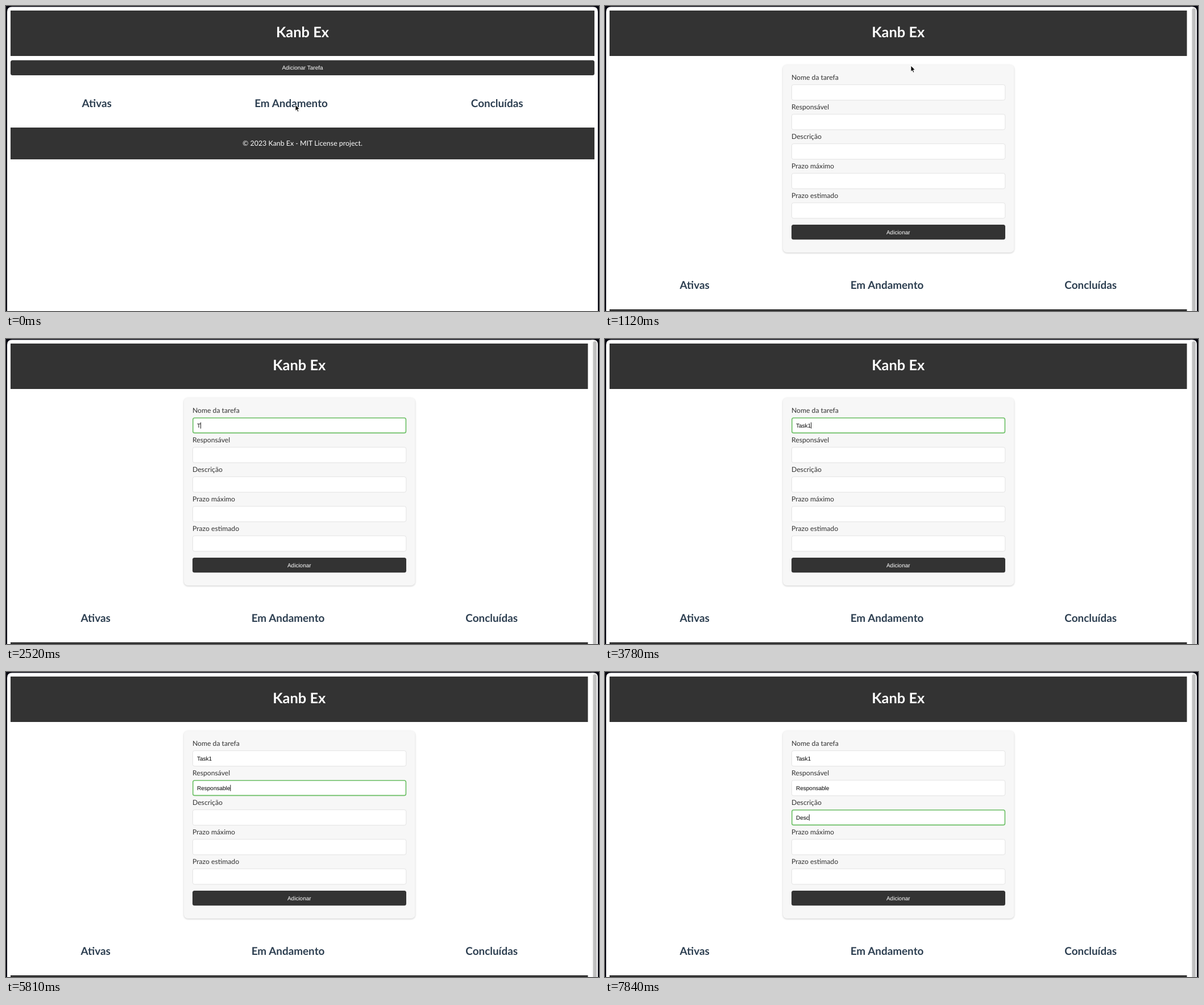
An HTML page for the animation above (8 s loop, 1043 by 537 pixels).

```html
<!DOCTYPE html>
<html lang="pt">
<head>
<meta charset="utf-8">
<title>Kanb Ex</title>
<style>
html, body { margin: 0; height: 100%; overflow: hidden; background: #080812; }
svg { display: block; width: 100%; height: 100%; text-rendering: geometricPrecision; }
text { font-family: Lato, sans-serif; white-space: pre; }
.mid { text-anchor: middle; }
.h1 { font-size: 25.4px; font-weight: 700; fill: #fff; }
.h2 { font-size: 18.9px; font-weight: 700; fill: #2c3e50; }
.label { font-size: 12.2px; fill: #333; }
.foot { font-size: 12.4px; fill: #fff; }
.ui { font: 10px "Liberation Sans", Arial, sans-serif; }
.dark { fill: #333; }
.light { fill: #fff; }
.form { fill: #f7f7f7; filter: drop-shadow(0 1.5px 1.5px rgba(0, 0, 0, .2)); }
.box { fill: #fff; stroke: #ddd; stroke-width: .8; }
.ring { fill: none; stroke: #6cc065; stroke-width: 1.6; }
</style>
</head>
<body>
<svg id="stage" viewBox="0 0 1043 537"></svg>
<script>
const LOOP = 8000, OPEN = 1120, BLINK = 560, FADE = 140;

// Focus time of each field and the time of each keystroke
const fields = [
  { label: 'Nome da tarefa', focus: 1960, word: 'Task1', keys: [2450, 2800, 2940, 3080, 3500] },
  { label: 'Responsável', focus: 3920, word: 'Responsable',
    keys: [4410, 4480, 4620, 4900, 5040, 5110, 5250, 5320, 5530, 5670, 5810] },
  { label: 'Descrição', focus: 6580, word: 'Desc', keys: [7490, 7560, 7700, 7840] },
  { label: 'Prazo máximo' },
  { label: 'Prazo estimado' }
];

// Pointer stops: time, x, y
const path = [[0, 509, 174], [210, 543, 164], [350, 543, 164], [630, 538, 105],
              [1330, 538, 105], [1610, 481, 153], [LOOP, 481, 153]];
const POINTER_HIDE = 2520;

const rect = (cls, x, y, w, h, r = 0) =>
  `<rect class="${cls}" x="${x}" y="${y}" width="${w}" height="${h}" rx="${r}"/>`;
const text = (cls, x, y, s) => `<text class="${cls}" x="${x}" y="${y}">${s}</text>`;

function page(width, top, centers) {
  const mid = 8 + width / 2;
  return rect('dark', 8, 8, width, 80) + text('h1 mid', mid, 55, 'Kanb Ex') +
    ['Ativas', 'Em Andamento', 'Concluídas']
      .map((s, i) => text('h2 mid', centers[i], top + 178, s)).join('') +
    rect('dark', 8, top + 214, width, 56) +
    text('foot mid', mid, top + 246, '© 2023 Kanb Ex - MIT License project.');
}

function fieldMarkup(f, i) {
  const y = 52 * i;
  return text('label', 328, 130 + y, f.label) +
    rect('box', 328.4, 138.6 + y, 375.4, 27.2, 3.2) +
    `<g class="entry">${rect('ring', 328.8, 139 + y, 374.6, 26.4, 3)}` +
    `${text('ui', 336, 155.7 + y, '')}${rect('caret', 336, 146.7 + y, .9, 11)}</g>`;
}

const stage = document.getElementById('stage');
stage.innerHTML =
  '<path fill="#fff" d="M2 540V10Q2 1.5 10.500 1.500H1032.500Q1041 1.500 1041 10V540Z"/>' +
  `<g id="closed">${page(1027, 0, [159.7, 501.6, 863.7])}` +
  rect('dark', 8, 95.6, 1027, 26.4, 3.5) +
  text('ui light mid', 521.5, 112.2, 'Adicionar Tarefa') + '</g>' +
  `<g id="open">${page(1015.5, 320, [157.7, 496.1, 854.2])}` +
  '<path fill="#fafafa" d="M1029.500 1.500H1033Q1041 1.500 1041 10V540H1029.500Z"/>' +
  '<rect fill="#c1c1c1" x="1032.500" y="4" width="6.500" height="560" rx="3.250"/>' +
  rect('form', 313, 103.5, 406.5, 330.5, 7) +
  fields.map(fieldMarkup).join('') +
  rect('dark', 328, 385, 376, 26.3, 3.5) +
  text('ui light mid', 515.8, 401.7, 'Adicionar') + '</g>' +
  '<path id="pointer" stroke="#fff" stroke-width=".9" ' +
  'd="M0 0V10.600L2.400 8.400L4.100 12.200L5.900 11.400L4.200 7.700H7.500Z"/>';

const closed = document.getElementById('closed');
const open = document.getElementById('open');
const pointer = document.getElementById('pointer');
const entries = [...document.querySelectorAll('.entry')];
const show = (el, on) => el.setAttribute('visibility', on ? 'inherit' : 'hidden');
const clamp = v => Math.max(0, Math.min(1, v));

function movePointer(t) {
  const i = path.findIndex(p => p[0] > t);
  const [t0, x0, y0] = path[i - 1], [t1, x1, y1] = path[i];
  const u = (t - t0) / (t1 - t0), e = u * u * (3 - 2 * u);
  pointer.setAttribute('transform', `translate(${x0 + (x1 - x0) * e} ${y0 + (y1 - y0) * e})`);
  show(pointer, t < POINTER_HIDE);
}

function updateField(f, i, t) {
  const [ring, label, caret] = entries[i].children;
  const { focus = Infinity, word = '', keys = [] } = f;
  const blur = fields[i + 1]?.focus ?? Infinity;
  const typed = keys.filter(k => k <= t);
  label.textContent = word.slice(0, typed.length);
  ring.setAttribute('opacity', clamp((t - focus) / FADE) * (1 - clamp((t - blur) / FADE)));
  const since = t - (typed.at(-1) ?? focus);
  const active = t >= focus && t < blur;
  show(caret, active && since % (2 * BLINK) < BLINK);
  if (active) caret.setAttribute('x', 336 + label.getComputedTextLength());
}

function frame(now) {
  const t = now % LOOP;
  show(closed, t < OPEN);
  show(open, t >= OPEN);
  movePointer(t);
  fields.forEach((f, i) => updateField(f, i, t));
  requestAnimationFrame(frame);
}
frame(0);
</script>
</body>
</html>
```
